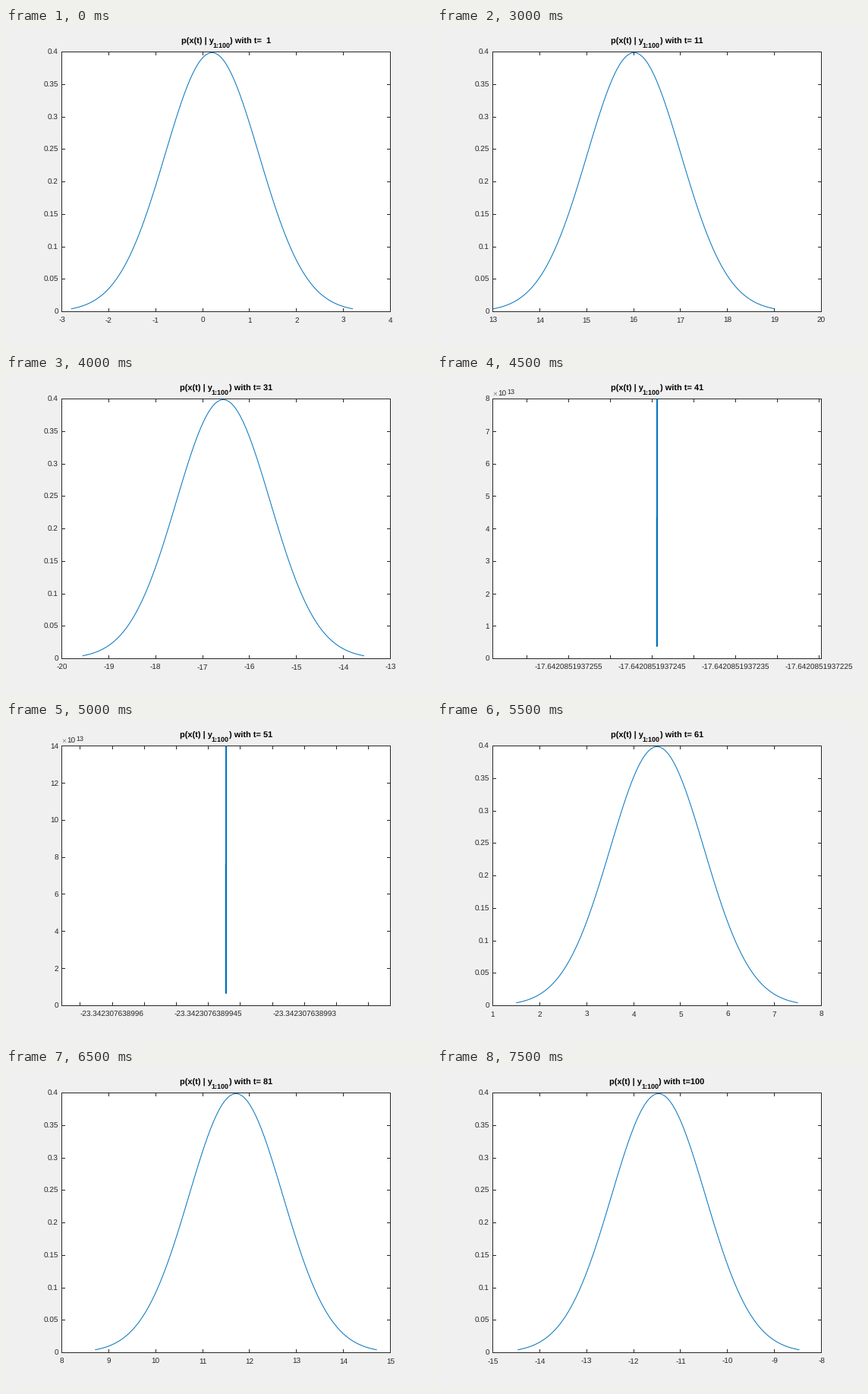
Animation of 560 by 420 pixels, one loop 9500 ms. Source, as a matplotlib script:

```python
import math

import matplotlib.pyplot as plt
import numpy as np
from matplotlib.animation import FuncAnimation
from matplotlib.patches import Rectangle

W, H, DPI = 560, 420, 100
LEFT, RIGHT, TOP, BOTTOM = 73.5, 506.5, 31.5, 373.5  # centres of the frame's pixels
MID = (LEFT + RIGHT) / 2
INK, BLUE = "#262626", "#0072BD"
PX = 72 / DPI  # points per pixel
TICK = 4.5

plt.rcParams["text.hinting"] = "none"


def bell(mean, lo, hi):
    """Unit normal density drawn out to three deviations."""
    return dict(kind="curve", means=[mean], sigma=1, x=(lo, hi, 1), y=(0.4, 0.05))


def spike(anchor, anchor_px, step, spacing, every, y, power):
    """Collapsed density; tick values are integers in units of 1e-13."""
    return dict(kind="spike", anchor=anchor, anchor_px=anchor_px, step=step,
                spacing=spacing, every=every, y=y, power=power)


VIEWS = [
    bell(0.2, -3, 4),
    bell(16.01, 13, 20),
    spike(123817264950318, 489, 2, 31.7, 3, (3, 0.5), 14),
    bell(-16.56, -20, -13),
    spike(-176420851937225, 503, 5, 55, 2, (8, 1), 13),
    spike(-233423076389960, 140, 5, 42.2, 3, (14, 2), 13),
    bell(4.5, 1, 8),
    dict(kind="curve", means=[12.499, 12.852], sigma=0.071,
         x=(12.2, 13.1, 0.1), y=(3, 0.5)),
    bell(11.71, 8, 15),
    bell(-12, -15, -9),
    bell(-11.47, -15, -8),
]

fig = plt.figure(figsize=(W / DPI, H / DPI), dpi=DPI, facecolor="#F0F0F0")
ax = fig.add_axes([0, 0, 1, 1])


def text(x, y, s, size=10, color=INK, **kw):
    ax.text(x, y, s, fontsize=size * PX, color=color, family="Liberation Sans",
            va="baseline", **kw)


def line(xs, ys, color=INK, width=1.0):
    ax.plot(xs, ys, color=color, lw=width * PX, snap=False,
            solid_capstyle="butt")


def frame_box(**kw):
    ax.add_patch(Rectangle((LEFT, TOP), RIGHT - LEFT, BOTTOM - TOP, snap=False, **kw))


def pixel_centre(v):
    return math.floor(v + 1e-6) + 0.5


def draw_title(t):
    size, sub = 11, 9
    tail = f") with t={t:3d}"
    head_w = 3.8 * size
    sub_w = 2.557 * sub
    digits = len(str(t))
    tail_w = (3.806 + 0.556 * digits + 0.278 * (3 - digits)) * size
    x = MID - (head_w + sub_w + tail_w) / 2
    bold = dict(color="black", weight="bold")
    text(x, 21, "p(x(t) | y", size, **bold)
    text(x + head_w, 26, "1:100", sub, **bold)
    text(x + head_w + sub_w, 21, tail, size, **bold)


def x_tick(x, label=None):
    tick_x = pixel_centre(x)
    line([tick_x, tick_x], [BOTTOM, BOTTOM - TICK])
    line([tick_x, tick_x], [TOP, TOP + TICK])
    if label:
        text(x, 388, label, ha="center")


def draw_y_axis(top, step):
    for i in range(round(top / step) + 1):
        y = BOTTOM - (BOTTOM - TOP) * i * step / top
        tick_y = pixel_centre(y)
        line([LEFT, LEFT + TICK], [tick_y, tick_y])
        line([RIGHT, RIGHT - TICK], [tick_y, tick_y])
        text(69, y + 3.5, f"{i * step:g}", ha="right")


def draw_curve(view):
    lo, hi, step = view["x"]
    sigma, means = view["sigma"], view["means"]

    def to_px(v):
        return LEFT + (RIGHT - LEFT) * (v - lo) / (hi - lo)

    for i in range(round((hi - lo) / step) + 1):
        x_tick(to_px(lo + i * step), f"{lo + i * step:g}")
    xs = np.linspace(means[0] - 3 * sigma, means[-1] + 3 * sigma, 101)
    scale = len(means) * sigma * math.sqrt(2 * math.pi)
    ys = sum(np.exp(-((xs - m) / sigma) ** 2 / 2) for m in means) / scale
    line(to_px(xs), BOTTOM - (BOTTOM - TOP) * ys / view["y"][0], BLUE)


def long_decimal(value):
    digits = str(abs(value))
    sign = "-" if value < 0 else ""
    return f"{sign}{digits[:-13]}.{digits[-13:]}".rstrip("0")


def draw_spike(view):
    for k in range(-15, 16):
        x = view["anchor_px"] + k * view["spacing"]
        if LEFT < x < RIGHT:
            value = view["anchor"] + k * view["step"]
            x_tick(x, long_decimal(value) if k % view["every"] == 0 else None)
    # The lower half is a touch wider on its left side.
    foot = 357.5
    line([MID, MID], [TOP, foot], BLUE, 2)
    line([MID - 0.25] * 2, [187, foot], BLUE, 2)
    text(73.5, 28, "×", color="#808080")
    text(80.5, 28, "10")
    text(92, 25, str(view["power"]), 9)


def draw(frame):
    # Half-second steps: hold the first view 3 s and the last one 2 s.
    index = min(max(frame - 5, 0), len(VIEWS) - 1)
    view = VIEWS[index]
    ax.clear()
    ax.set(xlim=(0, W), ylim=(H, 0))
    ax.axis("off")
    frame_box(facecolor="white", edgecolor="none")
    draw_y_axis(*view["y"])
    (draw_curve if view["kind"] == "curve" else draw_spike)(view)
    frame_box(fill=False, edgecolor=INK, lw=PX, zorder=1.5)
    draw_title(min(1 + 10 * index, 100))
    return []


anim = FuncAnimation(fig, draw, frames=19, interval=500, init_func=lambda: [],
                     repeat=True, repeat_delay=0)
plt.show()
```
